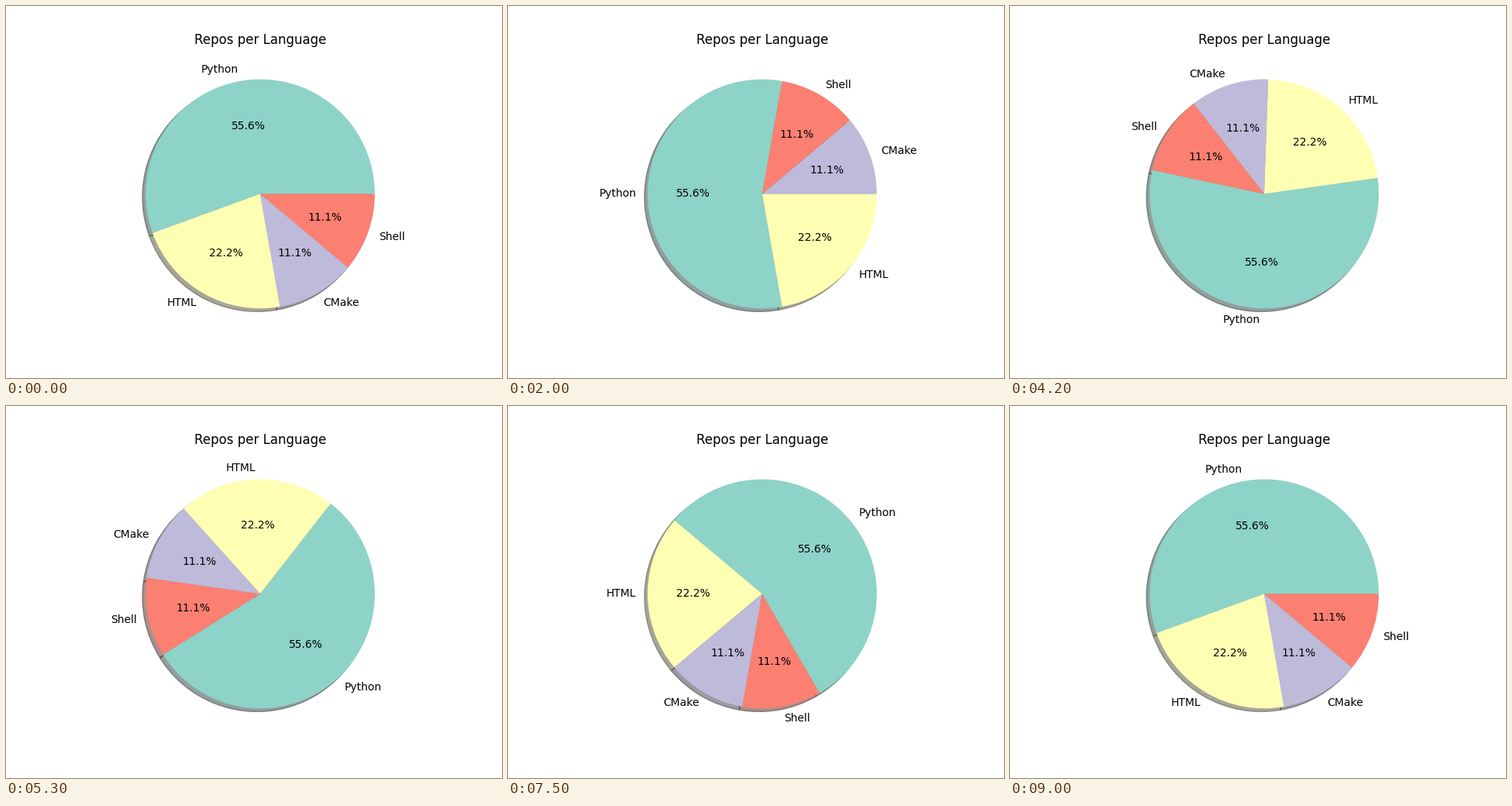
Recreate the animation shown at these times as a matplotlib script. Size 640x480 px, loop 9.1 s.

```python
import matplotlib.pyplot as plt
from matplotlib.animation import FuncAnimation

FRAMES = 91
STEP = 4  # degrees per frame

REPOS = {"Python": 5, "HTML": 2, "CMake": 1, "Shell": 1}
COLORS = ["#8dd3c7", "#ffffb3", "#bebada", "#fb8072"]

plt.rcParams["font.family"] = "DejaVu Sans"
fig, ax = plt.subplots(figsize=(6.4, 4.8), dpi=100)


def draw(i):
    ax.clear()
    ax.pie(
        list(REPOS.values()),
        labels=list(REPOS),
        colors=COLORS,
        autopct="%1.1f%%",
        shadow=True,
        startangle=i * STEP,
    )
    ax.set_title("Repos per Language")
    return []


anim = FuncAnimation(
    fig,
    draw,
    frames=FRAMES,
    init_func=lambda: draw(0),
    interval=100,
    repeat=True,
    repeat_delay=0,
    blit=False,
)

plt.show()
```
